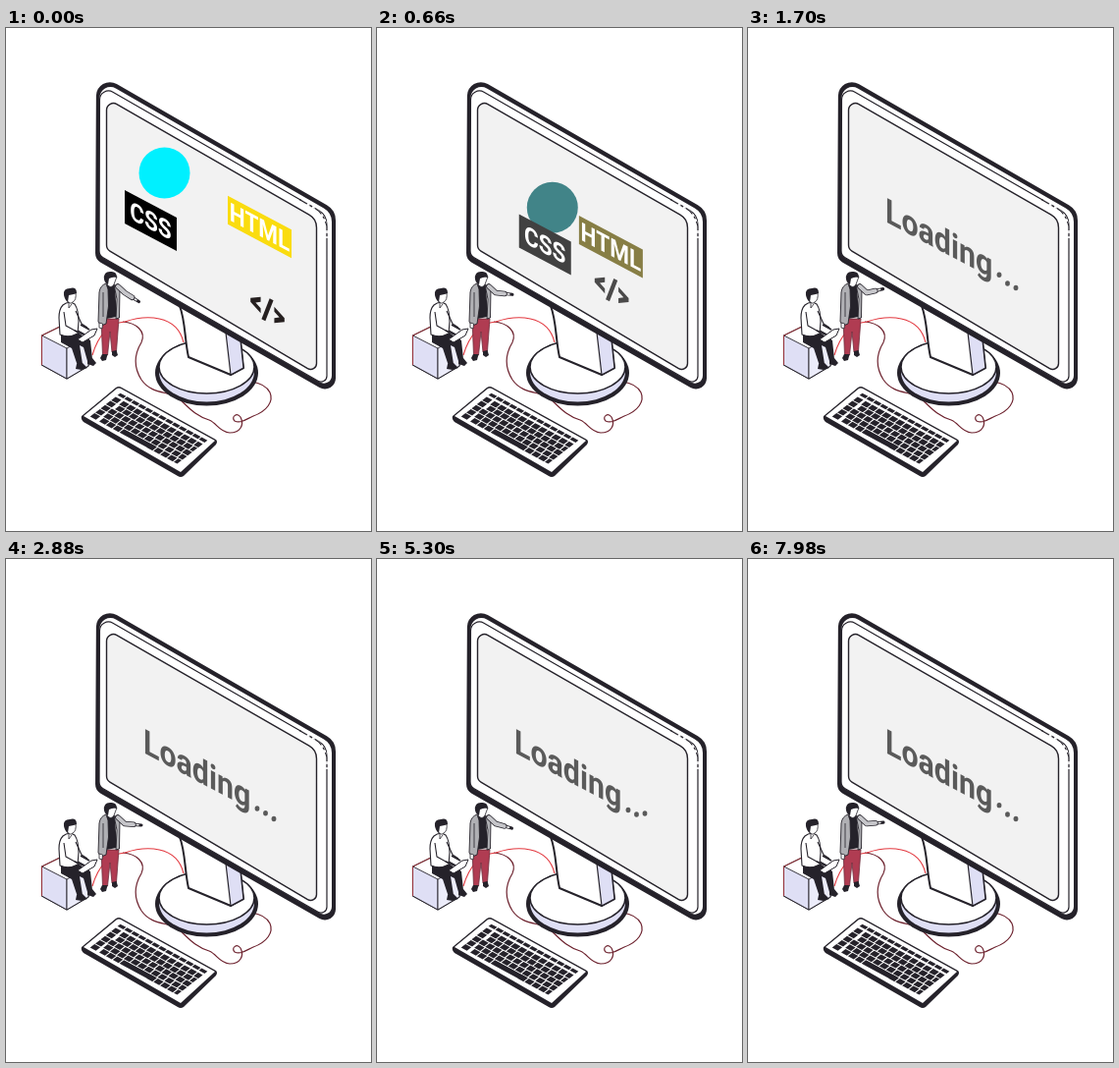
An HTML page with a canvas that plays this animation: 372x512 px, repeating every 8 s.

```html
<!DOCTYPE html>
<html lang="en">
<head>
<meta charset="utf-8">
<title>Loading</title>
<style>
html, body { margin: 0; width: 100%; height: 100%; overflow: hidden; background: #fff; }
canvas { display: block; width: 372px; height: 512px; }
</style>
</head>
<body>
<canvas></canvas>
<script>
const W = 372, H = 512, LOOP = 8000;
const INK = '#25222a', LILAC = '#dfdff5', GREY = '#b0b0b4', RED = '#b03c52';
const WIRE = '#e2383f', DARK_WIRE = '#6e2430';
const TONE = [90, 90, 90];
const SLOPE = 0.53, SQUASH = 0.866;

const canvas = document.querySelector('canvas');
const ctx = canvas.getContext('2d');
const dpr = window.devicePixelRatio || 1;
canvas.width = W * dpr;
canvas.height = H * dpr;

const clamp = (v) => Math.min(1, Math.max(0, v));
const lerp = (a, b, k) => a + (b - a) * k;
const mix = (a, b, k) => `rgb(${a.map((v, i) => Math.round(lerp(v, b[i], k))).join()})`;

function paint(path, fill, stroke, width = 1) {
  if (fill) { ctx.fillStyle = fill; ctx.fill(path); }
  if (stroke) { ctx.strokeStyle = stroke; ctx.lineWidth = width; ctx.stroke(path); }
}
const draw = (d, fill, stroke, width) => paint(new Path2D(d), fill, stroke, width);

function rounded(pts, radii) {
  const p = new Path2D(), n = pts.length, last = pts[n - 1];
  p.moveTo((last[0] + pts[0][0]) / 2, (last[1] + pts[0][1]) / 2);
  pts.forEach((a, i) => {
    const b = pts[(i + 1) % n];
    p.arcTo(a[0], a[1], b[0], b[1], radii[i]);
  });
  p.closePath();
  return p;
}

function disc(x, y, rx, ry, fill, stroke, width) {
  const p = new Path2D();
  p.ellipse(x, y, rx, ry, 0, 0, Math.PI * 2);
  paint(p, fill, stroke, width);
}

// Run fn in the tilted plane of the screen, with x, y as its zero point.
function onScreen(x, y, fn) {
  ctx.save();
  ctx.transform(SQUASH, SQUASH * SLOPE, 0, 1, x, y);
  fn();
  ctx.restore();
}

function cable() {
  draw('M119 299 C133 300 143 309 138 320 C129 335 131 347 138 358 C149 374 167 369 176 377 C186 386 193 395 207 399 C215 402 217 411 228 412 C239 412 243 404 239 396 C235 391 229 396 233 400 C239 403 245 398 252 395 C266 390 273 380 269 371 C265 363 257 361 250 360', null, DARK_WIRE, 1.2);
  draw('M88 333 C93 316 103 301 121 299 C142 292 174 291 181 320', null, WIRE, 1.1);
}

function stand() {
  disc(204.5, 351, 52.5, 33.5, INK);
  disc(204.5, 350, 48.5, 30.5, LILAC);
  disc(204.5, 345, 48.5, 27, '#fff', INK, 1.5);
  draw('M177 283 C183 298 182 318 186 335 L229 353 L242 346 L239 318 L222 308Z', '#fff', INK, 2);
  draw('M224 310 L239 318 L242 346 L229 353Z', LILAC, INK, 1.2);
}

function monitor() {
  paint(rounded([[92, 45], [336, 185.5], [336, 375.5], [91, 235.5]], [14, 18, 11, 11]), INK);
  paint(rounded([[95.5, 52], [332, 188], [332, 367.5], [95, 231.5]], [11, 16, 8, 9]), '#fff');
  paint(rounded([[95.5, 57.5], [327, 190.5], [327, 364.5], [95, 231.5]], [9, 17, 6, 8]), '#fff', INK, 1.2);
  draw('M301 175.5 L315 183.5 Q324 189 327 202 V214', null, '#fff', 1.6);
  ctx.setLineDash([9, 3, 3, 3]);
  draw('M299 174.5 L315 183.5 Q324 189 327 202 V214', null, INK, 1.2);
  ctx.setLineDash([]);
  paint(rounded([[102.5, 71.5], [316.5, 194.5], [316.5, 352], [102.5, 225]], [7, 15, 6, 7]), '#f2f2f2', INK, 1.4);
}

function keyboard() {
  draw('M77 395 L112 366 Q115 364 118 366 L214 419 Q216 421 214 424 L181 456 Q178 458 175 456 L79 401 Q76 398 77 395Z', INK);
  draw('M79 395 L113 367 Q115 366 117 367 L213 420 L178 452Z', '#fff');
  ctx.save();
  ctx.transform(98, 53, -36, 28, 115, 367);
  ctx.fillStyle = INK;
  const rows = 6, cols = 13;
  for (let r = 0; r < rows; r++) {
    const y = r ? 0.065 + r * 0.149 : 0.08;
    const shift = (r % 3) * 0.012;
    for (let c = 0; c < cols; c++) {
      if (r === rows - 1 && c > 4 && c < 8) continue;
      const space = r === rows - 1 && c === 4;
      const x = 0.045 + c * 0.0705 + (c ? shift : 0);
      const w = space ? 0.34 : c === cols - 1 ? 0.06 - shift : 0.06;
      ctx.fillRect(x, y, w, r ? 0.126 : 0.08);
    }
  }
  ctx.restore();
}

function seated() {
  draw('M36.5 313 L61 301 L84 314 V344 L62 357 L36.5 343Z', '#fff', INK, 1.2);
  draw('M36.5 313 L62 326 V357 L36.5 343Z', LILAC, INK, 0.9);
  draw('M62 326 L84 314 V344 L62 357Z', '#ececfa', INK, 0.9);
  draw('M36.5 343 V313 L55 304', null, WIRE, 0.6);
  // legs and shoes
  draw('M56 311 L73 310 L86 318 L88 337 L83 339 L79 325 L75 323 L78 342 L73 344 L67 326 L56 320Z', INK);
  draw('M72 342 L78 341 L83 346 L77 348 L71 347Z M83 337 L88 336 L92 341 L89 344 L83 342Z', INK);
  // torso and arms
  draw('M58 282 Q64 277 70 281 Q74 287 74 299 L73 311 Q64 316 55 312 L54 295 Q54 286 58 282Z', '#fff', INK, 1.1);
  draw('M59 289 L61 303 L72 309 M71 288 L77 301 L83 305', null, INK, 1.1);
  draw('M64 279 V285 L67 281', '#fff', INK, 0.8);
  draw('M73 317 L87 307 L93 306 L90 313 L78 320Z', '#fff', INK, 1);
  draw('M70 308 L79 312 M76 302 L85 307', null, INK, 1.8);
  // head
  draw('M62 270 L62 277 Q65 282 68 279 Q72 277 71 269Z', '#fff', INK, 0.8);
  draw('M59 272 Q58 265 65 265 Q72 263 72 270 L69 271 L64 272 L63 279 Q60 277 59 272Z', INK);
}

function standing(angle) {
  // trousers and shoes
  draw('M97 296 L115 296 L112.5 329 L108 330 L106 309 L103.5 333 L98.5 333Z', RED, '#6e2c3c', 0.8);
  draw('M98 332 L103.5 332 L102 338 L98 339 L96 336Z M108 329 L112.5 328 L114 333 L111 335 L108 333Z', INK);
  // jacket and shirt
  draw('M102 262 L111 262 L113 294 L102 296Z', INK);
  draw('M102 260 Q96 262 95 269 L94 299 L97 303 L102 301 L104.5 283 L104 266Z', GREY, INK, 0.9);
  draw('M110 261 L116 265 L115.5 295 L112 296 L113 276Z', GREY, INK, 0.9);
  draw('M99 269 L99 294', null, INK, 0.8);
  draw('M95 300 L98.5 301 L98 306 L95 305Z', '#fff', INK, 0.8);
  // head
  draw('M103 254 L103 261 Q107 266 110 261 L113 253Z', '#fff', INK, 0.8);
  draw('M100 256 Q99 248 106 248 Q113 247 113 254 L110 253 L105 255 L104 261 Q101 260 100 256Z', INK);
  // pointing arm
  ctx.save();
  ctx.lineCap = ctx.lineJoin = 'round';
  const a = angle * Math.PI / 180, ex = 121, ey = 269.5;
  const at = (d) => `${ex + d * Math.cos(a)} ${ey + d * Math.sin(a)}`;
  const sleeve = `M114 263 L${ex} ${ey} L${at(9)}`;
  draw(`M${at(9)} L${at(17)}`, null, INK, 3.2);
  draw(`M${at(10)} L${at(14)}`, null, '#fff', 1.5);
  draw(sleeve, null, INK, 5.6);
  draw(sleeve, null, '#c6c6ca', 4);
  ctx.restore();
}

// Forearm angle in degrees by time.
const ARM = [[0, 32], [660, 6], [1400, -13], [1700, -13], [2880, 5], [4280, 8], [6600, 25], [7020, 25], [8000, -5]];
function armAngle(t) {
  const i = ARM.findIndex((k) => t < k[0]);
  const [t0, a] = ARM[i - 1], [t1, b] = ARM[i];
  return lerp(a, b, (t - t0) / (t1 - t0));
}

function write(text, size, weight, align, color) {
  ctx.font = `${weight} ${size}px Roboto, sans-serif`;
  ctx.textAlign = align;
  ctx.textBaseline = 'alphabetic';
  ctx.fillStyle = color;
  ctx.fillText(text, 0, 0);
}

function label(text, x, y, w, h, color) {
  onScreen(x, y, () => {
    const bw = w / SQUASH;
    ctx.fillStyle = color;
    ctx.fillRect(-bw / 2, -h / 2, bw, h);
    ctx.translate(0, 9.2);
    write(text, 26, 600, 'center', '#fff');
  });
}

function codeMark(x, y, color) {
  onScreen(x, y, () => {
    draw('M-8 -9.5 L-20 -3 V1 L-8 7 V2 L-14 -1 L-8 -4.5Z', color);
    draw('M8 -7 L20 -1 V3 L8 9.5 V4.5 L14 1 L8 -2Z', color);
    draw('M2.5 -13 H7 L-2.5 12.5 H-7Z', color);
  });
}

const MERGE = 917;
function tags(t) {
  const k = clamp(t / MERGE);
  const go = (x, y, dx, dy) => [x + dx * k, y + dy * k];
  const tint = (rgb) => mix(rgb, TONE, k);
  disc(...go(161.5, 147.5, 24, 49), 26, 26, tint([0, 240, 255]));
  label('CSS', ...go(147.5, 196, 33, 34), 53, 34, tint([0, 0, 0]));
  label('HTML', ...go(258.5, 202.5, -28, 28), 65, 29, tint([250, 220, 15]));
  codeMark(...go(266.5, 287, -38, -28), tint([38, 32, 32]));
}

const FIRST = 840, STEP = 1640, HOP = 2480, CYCLE = 6180;
function loading(t) {
  const color = '#5a5a5a';
  onScreen(140, 197, () => write('Loading', 35, 700, 'left', color));
  for (let i = 0; i < 3; i++) {
    const p = clamp(((t - FIRST + CYCLE) % CYCLE - i * STEP) / HOP);
    const lift = 2.75 * (1 - Math.cos(p * Math.PI * 2));
    disc(256 + i * 8.5, 255.5 + i * 4.5 - lift, 2.4, 2.7, color);
  }
}

function frame(now) {
  const t = now % LOOP;
  ctx.setTransform(dpr, 0, 0, dpr, 0, 0);
  ctx.fillStyle = '#fff';
  ctx.fillRect(0, 0, W, H);
  ctx.lineJoin = 'round';
  cable();
  stand();
  monitor();
  keyboard();

  const fade = clamp((t - 860) / 120);
  if (fade < 1) { ctx.globalAlpha = 1 - fade; tags(t); }
  if (fade > 0) { ctx.globalAlpha = fade; loading(t); }
  ctx.globalAlpha = 1;

  seated();
  standing(armAngle(t));
}

let start = null;
function tick(now) {
  if (start === null) start = now;
  frame(Math.max(0, now - start));
  requestAnimationFrame(tick);
}
frame(0);
requestAnimationFrame(tick);
</script>
</body>
</html>
```
